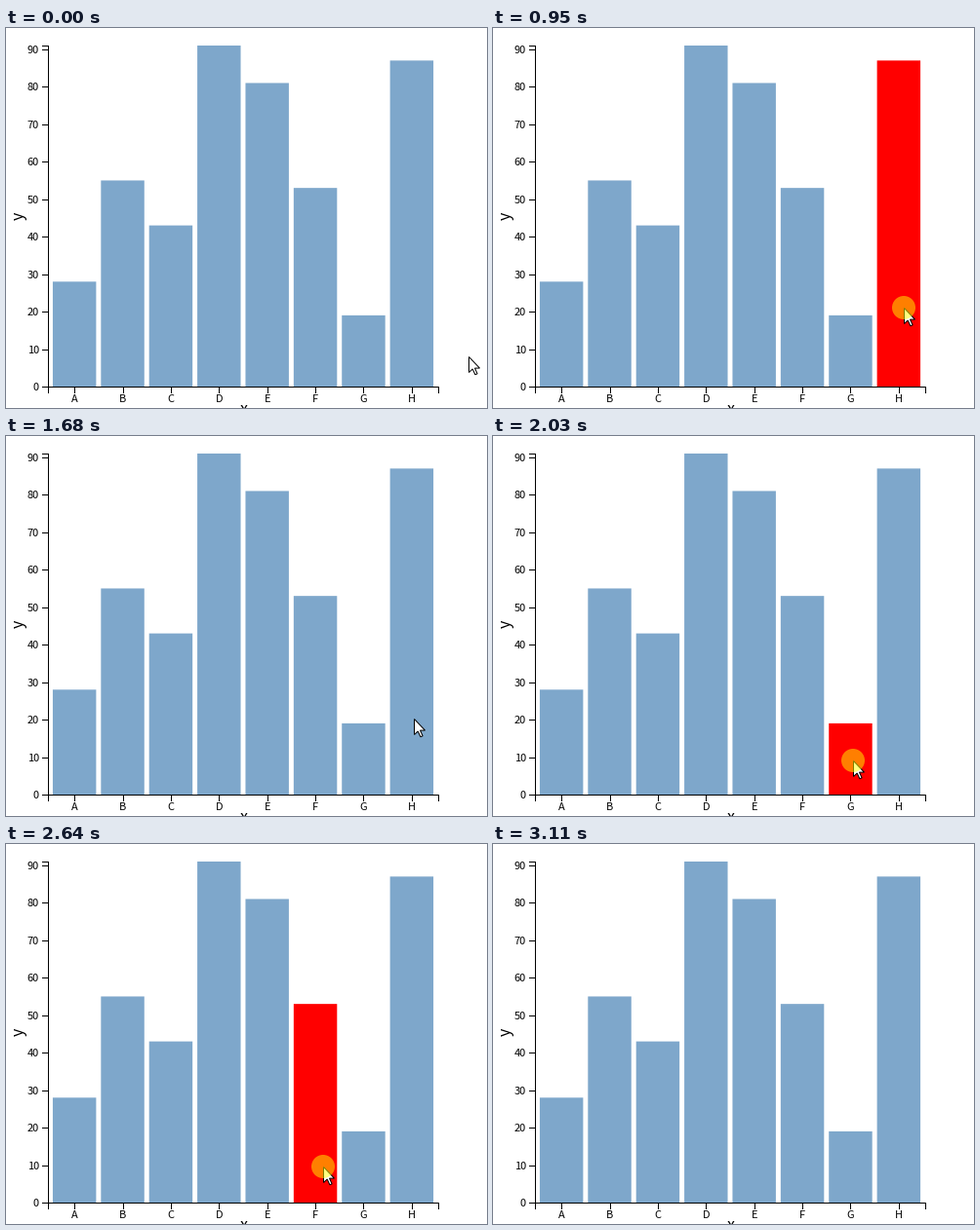
Animation, 493 px wide and 390 px high, one loop 3570 ms. Source, as a matplotlib script:

```python
import numpy as np
import matplotlib.pyplot as plt
from matplotlib.animation import FuncAnimation
from matplotlib.patches import Circle, Polygon, Rectangle

W, H, DPI = 493, 390, 64
LOOP, STEP = 3570, 10
PX = 72 / DPI  # points per pixel

LEFT, BASE, PLOT_W, PLOT_H = 43, 368, 400, 350
DATA = dict(A=28, B=55, C=43, D=91, E=81, F=53, G=19, H=87)
PAD = 0.1
BAND = PLOT_W / (len(DATA) + PAD)
BLUE, RED, YELLOW = "#7ea7cb", "#ff0000", "#ffff00"

START = (474, 337)
ARROW = np.array([(0, 0), (0, 16), (3.7, 12.5), (6.4, 18.3), (8.6, 17.3),
                  (6, 11.6), (11, 11.6)]) + 0.5


def smooth(u):
    return u ** 3 * (u * (6 * u - 15) + 10)


def speed_up(u):
    return u * u


# start ms, ms per step, steps, end point, easing
MOVES = [
    (260, 70, 1, (471, 334), smooth),
    (530, 73, 4, (421, 287), smooth),
    (1680, 70, 5, (369, 333), smooth),
    (2360, 70, 4, (325, 331), smooth),
    (2930, 90, 3, (370, 430), speed_up),
]
# start ms, end ms, bar
CLICKS = [(950, 1280, "H"), (2030, 2160, "G"), (2640, 2840, "F")]


def cursor_at(t):
    pos = np.array(START, float)
    for start, gap, steps, end, ease in MOVES:
        if t < start:
            break
        k = min((t - start) // gap + 1, steps)
        pos = pos + (np.array(end) - pos) * ease(k / steps)
    return np.round(pos)


def clicked_at(t):
    return next((name for a, b, name in CLICKS if a <= t < b), None)


def y_px(value):
    return BASE - value * PLOT_H / max(DATA.values())


plt.rcParams["font.family"] = ["Noto Sans CJK JP", "DejaVu Sans"]
fig = plt.figure(figsize=(W / DPI, H / DPI), dpi=DPI, facecolor="white")
ax = fig.add_axes([0, 0, 1, 1])
ax.set(xlim=(0, W), ylim=(H, 0))
ax.axis("off")


def label(x, y, text, size=11, ha="center", **kw):
    ax.text(x, y, text, size=size * PX, ha=ha, va="baseline",
            rotation_mode="anchor", **kw)


bars = {}
x_ticks = [LEFT, LEFT + PLOT_W]
y_ticks = [y_px(max(DATA.values())), BASE]

for i, (name, value) in enumerate(DATA.items()):
    x, width = LEFT + BAND * (i + PAD), BAND * (1 - PAD)
    top = y_px(value)
    bars[name] = ax.add_patch(Rectangle((x, top), width, BASE - top, lw=0,
                                        fc=BLUE, snap=False))
    x_ticks.append(round(x + width / 2))
    label(x + width / 2, BASE + 16, name)

for value in range(0, 91, 10):
    y = round(y_px(value))
    y_ticks.append(y)
    label(LEFT - 9, y + 4, str(value), ha="right")

label(18, 193, "y", 16, rotation=90)
label(243.5, 396.5, "x", 16)

line = dict(colors="black", lw=PX, snap=False)
ax.vlines(LEFT + 0.5, 18, BASE + 1, **line)
ax.hlines(BASE + 0.5, LEFT, LEFT + PLOT_W + 1, **line)
ax.vlines(np.array(x_ticks) + 0.5, BASE + 1, BASE + 7, **line)
ax.hlines(np.array(y_ticks) + 0.5, LEFT - 6, LEFT, **line)

cursor = ax.add_patch(Polygon(ARROW, fc="white", ec="black", lw=PX,
                              joinstyle="miter", snap=False, zorder=5))
halo = ax.add_patch(Circle((0, 0), 12, fc=YELLOW, alpha=0.5, lw=0, zorder=6))

# keep the limits fixed after adding lines
ax.set(xlim=(0, W), ylim=(H, 0))


def draw(i):
    t = i * STEP
    pos, clicked = cursor_at(t), clicked_at(t)
    for name, bar in bars.items():
        bar.set_facecolor(RED if name == clicked else BLUE)
    cursor.set_xy(ARROW + pos)
    halo.set_center(pos)
    halo.set_visible(clicked is not None)
    return [*bars.values(), cursor, halo]


anim = FuncAnimation(fig, draw, frames=LOOP // STEP, interval=STEP,
                     init_func=lambda: draw(0), repeat=True, repeat_delay=0)
plt.show()
```
